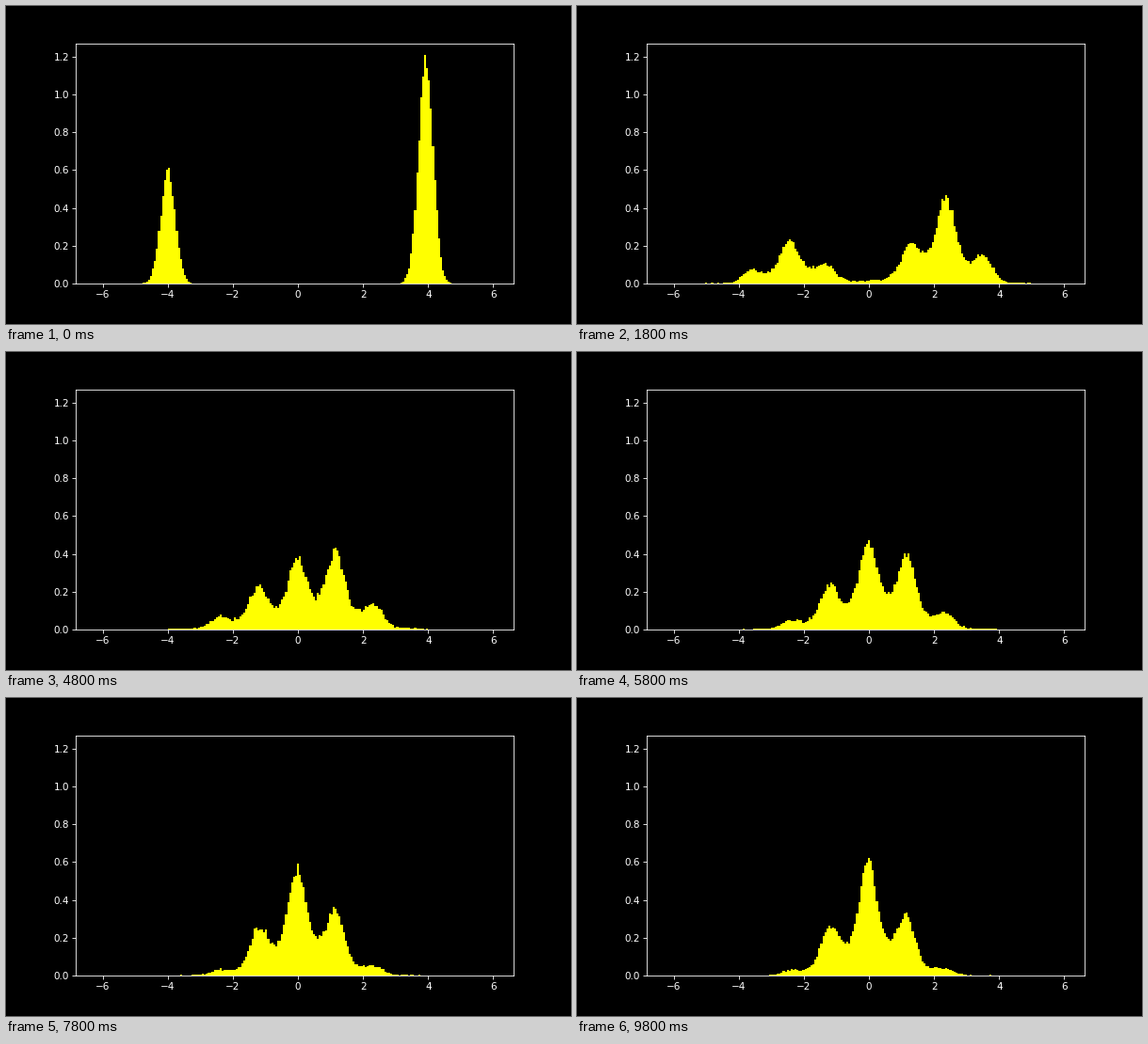
A matplotlib script that plays this animation: 600 px wide and 338 px high, repeating every 10000 ms.

```python
import numpy as np
import matplotlib.pyplot as plt
from matplotlib.animation import FuncAnimation

W, H, DPI = 600, 338, 75
FRAMES, INTERVAL = 50, 200
WALKERS = 45000
TIME_PER_FRAME, SUBSTEPS = 0.064, 8
PULL, RIPPLE, WAVE = 1.05, 0.56, 5.0   # U = PULL x^2/2 - RIPPLE cos(WAVE x)
EDGES = np.linspace(-6.1, 6.1, 201)


def slope(x):
    return PULL * x + RIPPLE * WAVE * np.sin(WAVE * x)


def simulate():
    """Overdamped Langevin walkers; one density histogram per frame."""
    rng = np.random.default_rng(7)
    centre = np.where(np.arange(WALKERS) < WALKERS // 3, -3.96, 3.96)
    x = centre + 0.2236 * rng.standard_normal(WALKERS)
    h = TIME_PER_FRAME / SUBSTEPS
    kick = np.sqrt(2 * h)
    rows = []
    for _ in range(FRAMES):
        rows.append(np.histogram(x, EDGES, density=True)[0])
        for _ in range(SUBSTEPS):
            x = x - h * slope(x) + kick * rng.standard_normal(WALKERS)
    return rows


density = simulate()

plt.style.use("dark_background")
plt.rcParams["font.family"] = "DejaVu Sans"
fig = plt.figure(figsize=(W / DPI, H / DPI), dpi=DPI)
ax = fig.add_axes([74.4 / W, 43.2 / H, 465 / W, 255.2 / H])
bars = ax.bar(EDGES[:-1], density[0], width=np.diff(EDGES),
              color="yellow", linewidth=0)
ax.set_xlim(-6.82, 6.635)
ax.set_ylim(0, 1.272)
ax.set_xticks(range(-6, 7, 2))
ax.set_yticks(np.arange(7) * 0.2)


def draw(frame):
    for bar, height in zip(bars, density[frame]):
        bar.set_height(height)
    return list(bars)


anim = FuncAnimation(fig, draw, frames=FRAMES, interval=INTERVAL,
                     init_func=lambda: draw(0), repeat=True, repeat_delay=0)
plt.show()
```
